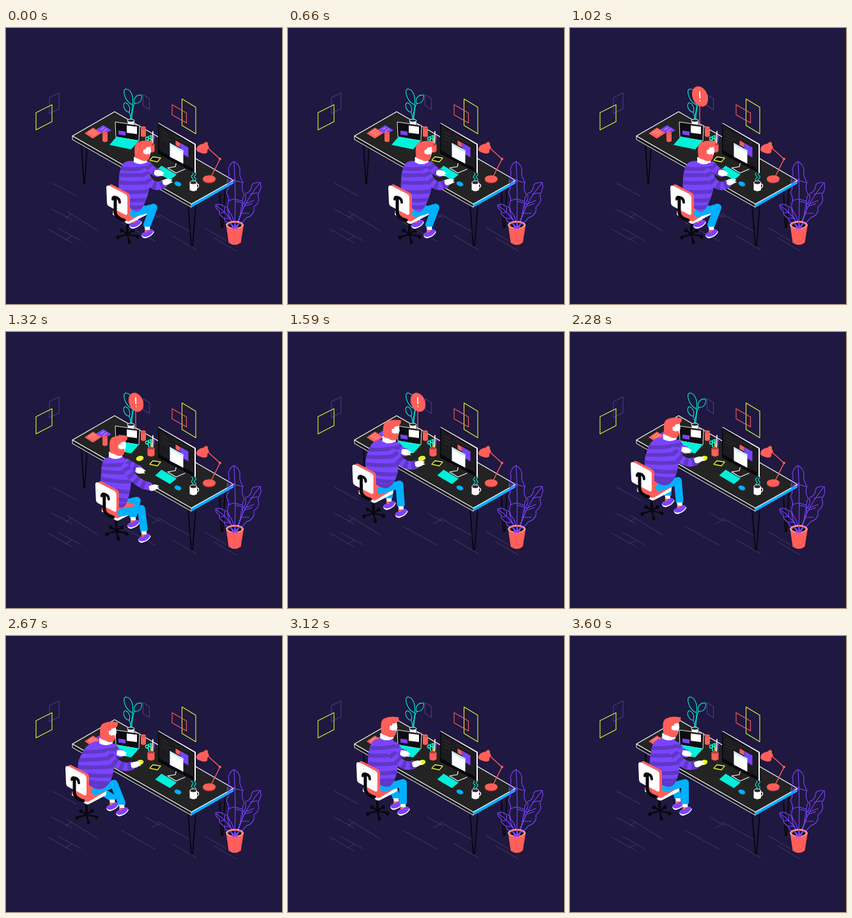
An HTML page for the animation above (3.63 s loop, 432 px wide and 432 px high).

```html
<!DOCTYPE html>
<html lang="en">
<head>
<meta charset="utf-8">
<title>Desk worker</title>
<style>
html, body { margin: 0; width: 100%; height: 100%; overflow: hidden; background: #1f1840; }
svg { display: block; width: 100vw; height: 100vh; }
.ln { fill: none; stroke-linecap: round; stroke-linejoin: round; }
.coral { fill: #ff5f5a; } .teal { fill: #00f0da; } .blue { fill: #00b0ff; }
.purple { fill: #7a44ff; } .white { fill: #fff; } .black { fill: #08070d; }
</style>
</head>
<body>
<svg viewBox="0 0 432 432" xmlns="http://www.w3.org/2000/svg">
<defs><clipPath id="torsoClip"><path id="torsoCut"/></clipPath></defs>
<rect width="432" height="432" fill="#1f1840"/>

<g class="ln" stroke="#4b4570" stroke-width=".8">
  <path d="M73 243l37 20M71 283l32 17M94 297l9-6M95 287l50 31M66 315l37 21M83 314l34 19M94 331l9-5"/>
  <path d="M180 304l54 30M218 283l24 14M228 300l11-6M238 291l52 29M260 325l38 22M311 313l34 20M325 328l35 21"/>
</g>

<g class="ln" stroke-width="1.1">
  <path stroke="#4b378e" d="M68 109l15-7.500v25l-15 7.500z"/>
  <path stroke="#e5f52c" d="M47 132.500l25-12.500v26.500l-25 13z"/>
  <path stroke="#4b378e" d="M214.500 104.500l10 6v17l-10-6z"/>
  <path stroke="#e5f52c" d="M275.500 111l21.500 13v41.500l-21.500-13z"/>
  <path stroke="#ff5f5a" d="M260 120l22.500 13v15.500l-22.500-12.500z"/>
</g>

<!-- desk -->
<path class="ln" stroke="#08070d" stroke-width="1.800" d="M118 182l4 62h1l4-57M285 278l5 63h2l5-64M334 253l3 59h2l4-64"/>
<path fill="#141418" stroke="#fff" stroke-width="1" stroke-linejoin="round" d="M104 169v5.500l186 106v-5.500z"/>
<path class="blue" d="M290 275v6l66-37.500v-6z"/>
<path fill="#232323" stroke="#fff" stroke-width="1.200" stroke-linejoin="round" d="M104 169l66-38 186 107.500-66 37z"/>

<path class="coral" d="M123 165l13-9 14 8-14 9z"/>
<path class="purple" d="M141 159l11-7 13 8-12 7z"/>
<path class="ln" stroke="#ffd0c8" stroke-width=".8" d="M129 164l8-5M132 166l9-5M136 168l7-4M148 159l5-3M152 162l6-4"/>
<g id="cans"></g>

<!-- small plant -->
<g class="ln" stroke="#00f0da" stroke-width="1.100">
  <path d="M196 144C195 134 199 127 198 120M198 120C187 116 181 98 187 95.500C196 95 200 108 198 120"/>
  <path d="M197 143C197 131 199 123 201 118M201 118C199 110 204 104 212 105C214 112 209 119 201 118"/>
  <path d="M195 143C195 138 195 135 192.500 132M192.500 132C185 130 182 121 186 117C191 117 196 125 192.500 132"/>
</g>
<path class="white" d="M190 145h11l-1 6q-4.500 2-9 0z"/>
<ellipse cx="195.500" cy="145" rx="5.500" ry="2.200" fill="#232323" stroke="#fff"/>

<!-- laptop -->
<path fill="#0d0c11" stroke="#fff" stroke-width=".9" stroke-linejoin="round" d="M171 147l38 5.500-1 24-36-6z"/>
<path class="purple" d="M176 160.500l11 1.500v6.500l-11-2z"/>
<path class="white" d="M189 152.500l16 2v11.500l-16-2z"/>
<path class="teal" d="M173 170l35 6.500-12 13.500-34-7z"/>

<!-- pencils, phone, pebble -->
<g class="ln" stroke-width="1.700">
  <path stroke="#e5f52c" d="M227 183l0-15"/><path stroke="#7a44ff" d="M230 183l2-14"/>
  <path stroke="#fff" d="M229 182l1-20"/><path stroke="#00f0da" d="M225 183l-3-8"/>
  <circle cx="221" cy="173" r="2.400" stroke="#00f0da"/><circle cx="225" cy="171" r="2" stroke="#00f0da"/>
</g>
<path class="coral" d="M221.500 182v11q5.500 4 11 0v-11z"/>
<ellipse cx="227" cy="182" rx="5.500" ry="2" fill="#b93d45"/>
<path d="M225 207l5-5.500 12 2-5 6z" fill="#0d0c11" stroke="#e5f52c" stroke-width="1.300" stroke-linejoin="round"/>
<ellipse cx="209.500" cy="198" rx="6" ry="4" fill="#e5f52c" transform="rotate(-15 209 198)"/>

<!-- monitor -->
<path class="ln" stroke="#fff" stroke-width="1.100" d="M267 209l-2 8-12 2 13 8 14-6"/>
<path class="black" d="M238 150l58 32v45l-58-30z"/>
<path fill="#1c1b1f" d="M239.500 152.500l55 30.500v38l-55-29.500z"/>
<path class="white" d="M238 149l1-.5 58 33v45l-2 .5v-44.500z"/>
<path class="ln" stroke="#484848" stroke-width=".7" stroke-dasharray="2 1.500" d="M245 163l8 4M245 168l14 8M245 173l9 5M264 170l20 11"/>
<path class="purple" d="M273 180l12.500 7v15.500l-12.500-7z"/>
<path class="coral" d="M265.500 176l7 4v7l-7-4z"/>
<path class="white" d="M256.500 180l21 11.500v21l-21-11z"/>
<path fill="#b7e8f2" d="M256.500 180l21 11.500v3l-21-11.500z"/>
<path class="teal" d="M233.500 224.500l10-9 23.500 14-10.500 8.500z"/>
<ellipse class="blue" cx="269" cy="244" rx="5.500" ry="3.500" transform="rotate(20 269 244)"/>

<!-- mug and lamp -->
<path class="ln" stroke="#fff" stroke-width="1.400" d="M299 244q4 1 2 5l-3 2"/>
<path class="white" d="M287.500 242v11.500q6 4 11.500 0v-11.500z"/>
<ellipse cx="293.200" cy="242" rx="5.300" ry="2.900" fill="#43202a" stroke="#fff"/>
<path id="steam" class="ln" stroke="#00f0da" stroke-width="1.100"/>
<ellipse cx="318" cy="237.500" rx="10" ry="5.500" fill="#b93d45"/>
<ellipse class="coral" cx="318" cy="236" rx="10" ry="5.500"/>
<path class="ln" stroke="#ff5f5a" stroke-width="1.400" d="M320 235l15-30-20-18"/>
<circle class="coral" cx="335" cy="205" r="2"/>
<path class="coral" d="M298 189q2-7 11-8l4-3q4 1 3 5l2 4q-3 2-3 8-4 3-11 0-7-2-6-6z"/>

<!-- floor plant -->
<g class="ln" stroke="#7a44ff" stroke-width="1.100">
  <path d="M361 309C369 296 366 284 370 276Q377 272 375 259Q384 257 385 245Q390 241 398 242Q401 252 394 261Q399 272 388 280Q390 293 376 297Q372 305 361 309z"/>
  <path d="M361 309Q371 275 397 243M373 276l15-6M373 279l12-4M382 260l12-2M370 290l11 0"/>
  <path d="M357 308Q345 292 347 275Q351 269 345 257Q351 249 346 240Q351 228 348 221Q351 211 357 209Q367 214 366 225Q365 233 371 241Q367 251 373 261Q368 270 371 281Q369 294 360 307z"/>
  <path d="M358 307Q360 260 357 210M358 237l-11 3M359 240l-12 3M359 239l11 3M359 267l-10 3M359 268l11 3M359 271l11 3"/>
  <path d="M356 308Q343 307 341 297Q333 294 334 286Q328 283 328 277Q335 274 341 279Q348 280 349 287Q356 295 357 307z"/>
  <path d="M356 307Q347 290 329 278M342 288l0-8M342 289l-7 0M349 298l-8 0"/>
</g>
<path class="coral" d="M344.500 308l4 28q9.500 7 19 0l4.500-28z"/>
<ellipse cx="358" cy="308" rx="13.300" ry="5.300" fill="#ff5f5a" stroke="#fff" stroke-width=".9"/>
<ellipse class="black" cx="358" cy="309" rx="10.500" ry="4"/>
<path class="purple" d="M354 314q-1-6-5-9 6 1 8 6 0-6 2-10 1 6 1 9 3-5 7-6-4 6-5 10z"/>

<!-- worker -->
<g id="legFar"></g>
<g id="chairLow">
  <g class="ln" stroke="#08070d"><path stroke-width="4" d="M15 36v19"/><path id="star" stroke-width="2.600"/></g>
  <g id="wheels" class="black"></g>
  <path class="white" d="M-8 20v4l22 14q2 1 5 0l25-13q2-1 2-4v-4z"/>
  <path class="coral" d="M-8 19l27-15 26 10q2 2-1 5l-25 15q-3 1-5 0l-22-12z"/>
</g>
<g id="legNear"></g>
<g id="armFar"></g>
<path id="torso" class="purple"/>
<path id="stripes" class="ln" stroke="#5f38c4" stroke-width="6" clip-path="url(#torsoClip)"/>
<g id="armNear"></g>
<g id="chairBack">
  <path class="coral" d="M-14-20q1-4 5-3l25 13q3 2 3 6v24q0 4-4 3z"/>
  <path class="white" d="M-18-18q0-5 5-3l25 13q3 2 3 6v23q0 5-4 3l-25-13q-3-2-3-5z"/>
  <g class="ln" stroke="#08070d"><path stroke-width="4" d="M-8 0Q-8-5-3-3Q3-1 3 5"/><path stroke-width="5" d="M-4-1V20Q-4 29 10 33"/></g>
</g>
<g id="head">
  <path class="white" d="M-14 10q10-4 21 1v7q-11 6-21 0z"/>
  <path class="white" d="M3-7l9 0 1 8-3 10-8 2z"/>
  <path class="coral" d="M-12 11Q-15-10-8-13Q0-17 11-15.500L15-15Q16-9 11-6L5-5 4 6 10 5Q12 11 8 15Q2 18-4 14z"/>
  <path class="white" d="M1-1q4-3 5 1 0 5-4 5-2-2-1-6z"/>
</g>

<g id="alert">
  <path class="ln" stroke="#ff5f5a" stroke-width="1.300" d="M203 152v-30"/>
  <ellipse class="coral" cx="203.500" cy="110" rx="11" ry="15.500" transform="rotate(-22 203.500 110)"/>
  <path class="ln" stroke="#fff" stroke-width="1.800" d="M203 103l.3 9M203.500 116.500v.2"/>
</g>
</svg>
<script>
const LOOP = 3630, el = id => document.getElementById(id);
const set = (id, name, value) => el(id).setAttribute(name, value);
const clamp = v => Math.max(0, Math.min(1, v));
const mix = (a, b, f) => a + (b - a) * f;
const mixPt = (p, q, f) => [mix(p[0], q[0], f), mix(p[1], q[1], f)];
const shift = (p, x, y) => [p[0] + x, p[1] + y];
const line = pts => 'M' + pts.map(p => p[0].toFixed(2) + ' ' + p[1].toFixed(2)).join('L');

const easeIn = f => f * f;
const easeOut = f => 1 - (1 - f) * (1 - f);
const easeBoth = f => f < .5 ? 4 * f * f * f : 1 - Math.pow(2 - 2 * f, 3) / 2;
const overshoot = f => 1 + 4.2 * Math.pow(f - 1, 3) + 3.2 * Math.pow(f - 1, 2);

const parts = ['chair', 'head', 'torso', 'armNear', 'armFar', 'legNear', 'legFar'];
function pose(points) {
  const out = {};
  for (const k of parts) out[k] = points[k].split(' ').map(s => s.split(',').map(Number));
  return out;
}
// torso: neck, shoulder, back, hip, seat, belly, chest, neck front
const desk = pose({
  chair: '175,268', head: '214,192',
  torso: '197,208 183,213 177,234 180,264 205,288 221,264 226,232 221,211',
  armNear: '216,226 228,255 253,240', armFar: '222,215 231,226 240,227',
  legNear: '200,290 231,281 221,314', legFar: '198,285 214,283 202,299'
});
const roll = pose({
  chair: '158,257', head: '175,178',
  torso: '164,196 153,201 149,222 152,250 178,276 191,262 196,225 185,197',
  armNear: '187,212 203,238 232,243', armFar: '189,205 200,212 211,217',
  legNear: '180,283 212,277 216,315', legFar: '180,270 205,264 199,293'
});
const lean = pose({
  chair: '113,225', head: '160,150',
  torso: '146,164 128,172 118,197 121,222 146,240 164,228 171,195 166,167',
  armNear: '162,186 178,210 203,200', armFar: '168,175 174,185 182,184',
  legNear: '140,243 169,233 171,270', legFar: '138,240 153,240 152,259'
});
const tuck = pose({
  chair: '111,225', head: '160,150',
  torso: '146,164 126,173 113,199 118,222 144,240 163,228 170,195 165,167',
  armNear: '161,186 178,210 203,200', armFar: '168,175 174,185 182,184',
  legNear: '140,243 169,231 181,267', legFar: '138,245 153,245 166,259'
});
const sit = pose({
  chair: '125,219', head: '158,142',
  torso: '146,160 131,167 125,192 128,222 155,236 168,222 172,190 164,162',
  armNear: '162,183 179,208 203,200', armFar: '167,172 175,184 183,183',
  legNear: '150,238 180,230 180,266', legFar: '148,243 166,242 169,257'
});
const keys = [[0, desk], [1050, desk, easeBoth], [1320, roll, easeIn], [1740, lean, easeOut],
  [2200, lean, easeBoth], [2560, tuck, easeBoth], [2760, tuck, easeBoth],
  [3080, sit, easeBoth], [LOOP, sit, easeBoth]];

function poseAt(t) {
  let i = 1;
  while (i < keys.length - 1 && t > keys[i][0]) i++;
  const [t0, a] = keys[i - 1], [t1, b, ease] = keys[i];
  const f = ease(clamp((t - t0) / (t1 - t0))), out = {};
  for (const k of parts) out[k] = a[k].map((p, j) => mixPt(p, b[k][j], f));
  return out;
}

// closed smooth curve through the points
function blob(p) {
  const n = p.length, at = i => p[(i + n) % n];
  let d = 'M' + p[0];
  for (let i = 0; i < n; i++) {
    const a = at(i - 1), b = at(i), c = at(i + 1), e = at(i + 2);
    d += `C${b[0] + (c[0] - a[0]) / 6} ${b[1] + (c[1] - a[1]) / 6} ${c[0] - (e[0] - b[0]) / 6} ${c[1] - (e[1] - b[1]) / 6} ${c[0]} ${c[1]}`;
  }
  return d + 'z';
}
function along(pts, f) {
  const s = f * (pts.length - 1), i = Math.min(pts.length - 2, Math.floor(s));
  return mixPt(pts[i], pts[i + 1], s - i);
}
function stripes(p) {
  const left = p.slice(1, 5), right = [p[7], p[6], p[5], p[4]];
  let d = '';
  for (let k = 0; k < 6; k++) {
    const f = (k + .7) / 6.5, a = shift(along(left, f), -4, 0), b = shift(along(right, f), 5, 0);
    const m = mixPt(a, b, .5);
    d += `M${a}Q${m[0]} ${m[1] + 4} ${b}`;
  }
  return d;
}

for (const id of ['armNear', 'armFar']) {
  el(id).innerHTML = `<path class="ln" stroke="#7a44ff" stroke-width="13"/>
    <path fill="none" stroke="#5f38c4" stroke-width="13" stroke-dasharray="6 6"/>
    <path class="white" d="M-8-3Q-3-5 2-4L8-1 5 1 8 3 3 4 0 5Q-6 6-8 3z"/>`;
}
for (const id of ['legNear', 'legFar']) {
  el(id).innerHTML = `<path class="ln" stroke="#00b0ff" stroke-width="12"/>
    <g><path class="white" d="M-4-3h8l1 8h-8z"/><path class="coral" d="M-4 2h9v5h-9z"/>
    <path class="white" d="M-9 10Q-8 16-2 15Q8 12 11 5l-2-2z"/>
    <path class="purple" d="M-9 9Q-6 4-1 6Q3 1 7 1Q11 2 9 6Q5 12-3 13Q-8 13-9 9z"/></g>`;
}
el('cans').innerHTML = [[155, 164], [215, 156]].map(([x, y]) =>
  `<path class="coral" d="M${x - 4} ${y}v13q4 3 8 0v-13z"/>
   <ellipse cx="${x}" cy="${y}" rx="3.800" ry="2" fill="#ff5f5a" stroke="#c23f49" stroke-width=".8"/>`).join('');

const feet = [[-15, 4], [-9, -7], [9, -7], [16, 3], [3, 11]];
set('star', 'd', feet.map(([x, y]) => `M15 55L${15 + x} ${55 + y}`).join(''));
el('wheels').innerHTML = feet.map(([x, y]) =>
  `<ellipse cx="${15 + x}" cy="${56 + y}" rx="2.500" ry="3"/>`).join('');

function drawArm(id, pts, turn) {
  const [sleeve, bands, hand] = el(id).children, [a, b, c] = pts;
  const cuff = mixPt(b, c, .72), d = `M${a}Q${b} ${cuff}`;
  sleeve.setAttribute('d', d);
  bands.setAttribute('d', d);
  hand.setAttribute('transform', `translate(${c}) rotate(${turn})`);
}
function drawLeg(id, pts) {
  const [cloth, foot] = el(id).children;
  cloth.setAttribute('d', line([pts[0], pts[1], shift(pts[2], 0, -6)]));
  foot.setAttribute('transform', `translate(${pts[2]})`);
}
function drawSteam(t) {
  let d = '';
  for (const x of [291.5, 296]) {
    const pts = [];
    for (let y = 227; y <= 239; y++) pts.push([x + 1.4 * Math.sin(y * .75 + t * Math.PI * 10 / LOOP), y]);
    d += line(pts);
  }
  set('steam', 'd', d);
}

function render(ms) {
  const t = ms % LOOP, p = poseAt(t);
  const typing = 1 - clamp((t - 850) / 150) + clamp((t - 1740) / 150);
  const tap = Math.sin(t / 42) * typing, sway = Math.sin(t / 420) * .6;
  const glance = t < 1320 ? Math.sin(clamp(t / 1320) * Math.PI) * -1.6 : 0;

  set('chairLow', 'transform', `translate(${p.chair[0]})`);
  set('chairBack', 'transform', `translate(${p.chair[0]})`);
  set('head', 'transform', `translate(${shift(p.head[0], glance + sway * .5, sway * .5)})`);

  const body = p.torso.map((q, i) => i < 3 || i > 5 ? shift(q, sway * .5, 0) : q);
  const shape = blob(body);
  set('torso', 'd', shape);
  set('torsoCut', 'd', shape);
  set('stripes', 'd', stripes(body));

  const near = p.armNear.slice(), far = p.armFar.slice();
  near[2] = shift(near[2], tap * .7, tap);
  far[2] = shift(far[2], -tap * .7, -tap);
  drawArm('armNear', near, -12 + tap * 4);
  drawArm('armFar', far, 12 - tap * 4);
  drawLeg('legNear', p.legNear);
  drawLeg('legFar', p.legFar);
  drawSteam(t);

  const grow = t < 720 ? 0 : overshoot(clamp((t - 720) / 360));
  set('alert', 'transform', `translate(203 152) scale(${Math.max(0, grow)}) translate(-203 -152)`);
  set('alert', 'opacity', t < 720 ? 0 : 1 - clamp((t - 1860) / 260));
}

function tick(now) {
  render(now);
  requestAnimationFrame(tick);
}
render(0);
requestAnimationFrame(tick);
</script>
</body>
</html>
```
